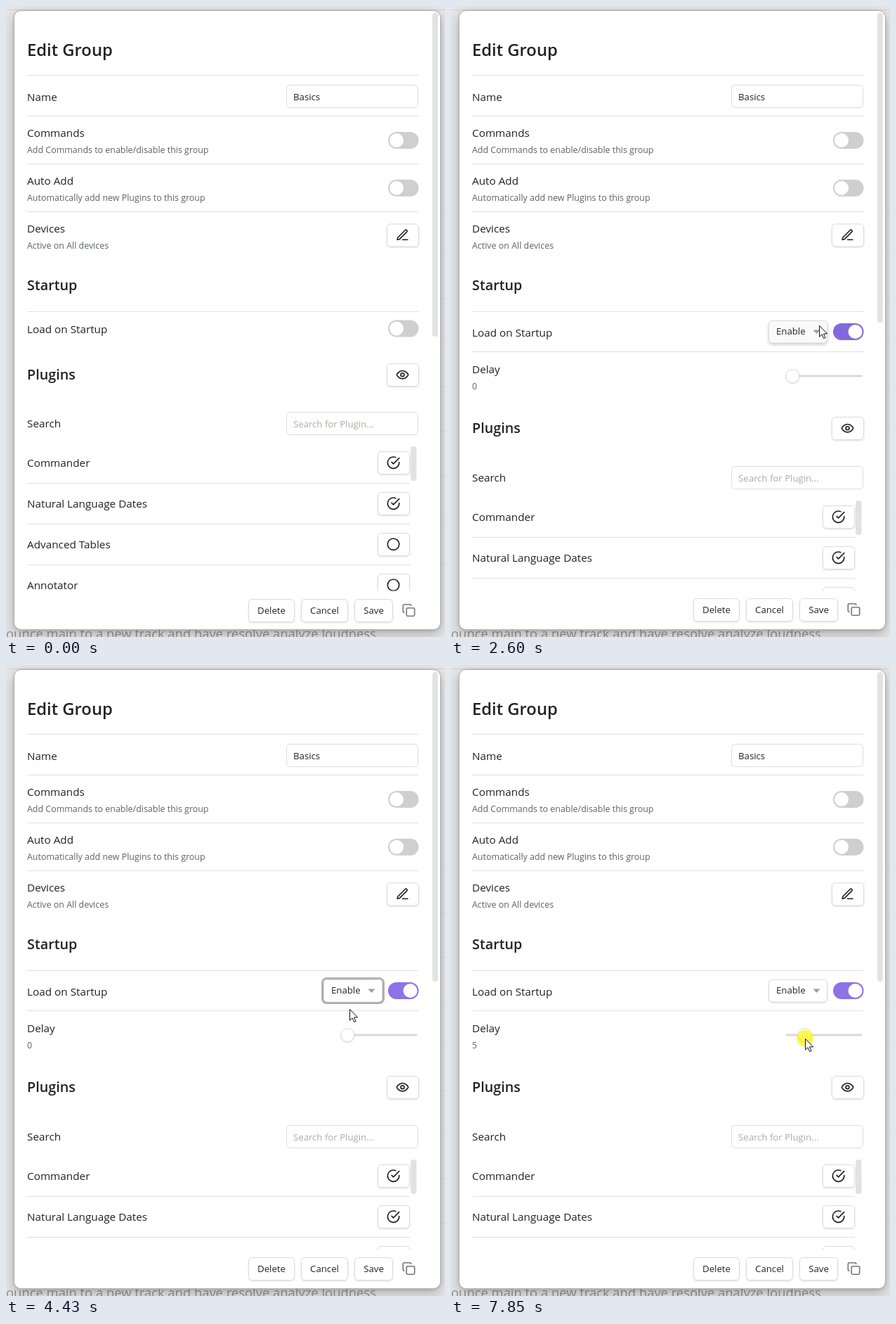
An HTML page that plays this animation: 625x897 px, repeating every 8000 ms.

```html
<!DOCTYPE html>
<html lang="en">
<head>
<meta charset="utf-8">
<title>Edit Group</title>
<style>
html, body { margin: 0; width: 100%; height: 100%; overflow: hidden; background: #e6e6e6; }
svg { display: block; font-family: "Open Sans", "Noto Sans", sans-serif; }
text { fill: #222; white-space: pre; }
.h1 { font-size: 23.8px; font-weight: 600; }
.h2 { font-size: 19.8px; font-weight: 600; }
.row { font-size: 15.3px; }
.sub { font-size: 12.45px; fill: #5f6360; }
.ui { font-size: 13.2px; }
.mid { text-anchor: middle; }
.hint { font-size: 13.2px; fill: #a9ada6; }
.page { font-size: 18.4px; fill: #929292; }
.rule { stroke: #e0e0e0; }
.box { fill: #fff; stroke: #dcdcdc; }
.btn { filter: drop-shadow(0 1px 1px rgba(0,0,0,.13)); }
.hover { fill: #fafafa; filter: drop-shadow(0 2px 2px rgba(0,0,0,.2)); }
.bar { fill: #e2e2e2; }
.icon { fill: none; stroke: #1f1f1f; stroke-width: 2; stroke-linecap: round; stroke-linejoin: round; }
.modal { fill: #fff; stroke: #b0b0b0; filter: drop-shadow(0 1px 2px rgba(0,0,0,.15)) drop-shadow(0 7px 9px rgba(0,0,0,.22)); }
.menu { fill: #fff; stroke: #aaa; stroke-width: .8; filter: drop-shadow(0 18px 16px rgba(0,0,0,.34)); }
</style>
</head>
<body>
<svg id="stage" width="625" height="897" viewBox="0 0 625 897"></svg>
<script>
const LOOP = 8000;
const TICK = 67;
const [SWITCH, OPEN, CHOOSE] = [2000, 2740, 4360]; // clicks
const HOLD = 6060; // slider grabbed

// Pointer stops: start, steps, x, y
const STOPS = [
  [0, 1, 597, 920],
  [320, 1, 597, 888],
  [390, 1, 640, 550],
  [850, 10, 565, 438],
  [1720, 2, 568, 449],
  [2530, 2, 524, 454],
  [3280, 7, 485, 502],
  [3950, 3, 489, 489],
  [4520, 5, 441, 537],
  [4920, 6, 475, 536],
  [5520, 2, 479, 532],
  [6390, 1, 486, 532],
  [6660, 7, 489, 531],
  [7390, 2, 497, 531],
  [7770, 2, 504, 531]
];

const ICONS = {
  pen: '<path d="M12 20h9M16.5 3.5a2.12 2.12 0 0 1 3 3L7 19l-4 1 1-4Z"/>',
  eye: '<path d="M2 12s3-7 10-7 10 7 10 7-3 7-10 7-10-7-10-7Z"/><circle cx="12" cy="12" r="3"/>',
  check: '<path d="M22 11.08V12a10 10 0 1 1-5.93-9.14M9 11l3 3L22 4"/>',
  ring: '<circle cx="12" cy="12" r="10"/>',
  copy: '<rect x="8" y="8" width="14" height="14" rx="2"/><path d="M4 16c-1.1 0-2-.9-2-2V4c0-1.1.9-2 2-2h10c1.1 0 2 .9 2 2"/>'
};

// Markup helpers
const text = (cls, x, y, s) => `<text class="${cls}" x="${x}" y="${y}">${s}</text>`;
const rule = (y, x2 = 587.5) => `<path class="rule" d="M30 ${y}H${x2}"/>`;
const rect = (cls, x, y, w, h, r = 5) =>
  `<rect class="${cls}" x="${x}" y="${y}" width="${w}" height="${h}" rx="${r}"/>`;
const icon = (name, cx, cy, extra = '') =>
  `<g class="icon" transform="translate(${cx} ${cy}) scale(.82) translate(-12 -12)" ${extra}>${ICONS[name]}</g>`;
const iconBtn = (name, x, y) =>
  rect('box btn', x + .5, y + .5, 45, 32) + icon(name, x + 22.5, y + 16.2);
const textBtn = (s, x, w) =>
  rect('box btn', x + .5, 843.5, w, 32) + text('ui mid', x + w / 2 + .5, 864, s);
const input = (cls, y, s) => rect('box', 399.5, y + .5, 187, 32) + text(cls, 409, y + 21.5, s);
const group = (id, body) => `<g id="${id}">${body}</g>`;
const toggle = cy =>
  `<rect x="544" y="${cy - 12}" width="43.5" height="24" rx="12" fill="#cfcfcf"/>` +
  `<circle cx="556" cy="${cy}" r="10" fill="#fff"/>`;

const settings = [
  ['Commands', 'Add Commands to enable/disable this group', toggle],
  ['Auto Add', 'Automatically add new Plugins to this group', toggle],
  ['Devices', 'Active on All devices', cy => iconBtn('pen', 542, cy - 17)]
].map(([name, note, control], i) => {
  const top = 156.5 + 68 * i;
  return rule(top) + text('row', 30, top + 29.5, name) + text('sub', 30, top + 52.5, note) + control(top + 34.5 - i * .25);
}).join('');

const plugins = ['Commander', 'Natural Language Dates', 'Advanced Tables', 'Annotator'].map((name, i) => {
  const y = 633 + Math.round(i * 58.1);
  return text('row', 30, y + 22, name) + iconBtn(i < 2 ? 'check' : 'ring', 529, y) + rule(y + 45.5, 575);
}).join('');

let pageLines = '';
for (let y = 289.5; y < 800; y += 63) pageLines += `<path d="M618 ${y}H625" stroke="#d8d8d8"/>`;

document.getElementById('stage').innerHTML =
  '<defs><clipPath id="cut"><rect x="12" y="560" width="600" height="271.5"/></clipPath></defs>' +
  '<path d="M0 5.5H625" stroke="#d2d2d2"/>' + pageLines +
  text('page', 0, 899, 'ounce main to a new track and have resolve analyze loudness') +
  rect('modal', 11.5, 6.5, 607, 880, 10) +
  '<rect id="scroll" class="bar" x="607" y="10" width="8" rx="4"/>' +
  text('h1', 30, 71, 'Edit Group') + rule(98.5) +
  text('row', 30, 135, 'Name') + input('ui', 112, 'Basics') + settings +
  text('h2', 30, 404, 'Startup') + rule(434.5) +
  group('load', text('row', 30, 465, 'Load on Startup') + group('startup', toggle(458.5))) +
  group('delay', rule(491.5) + text('row', 30, 522, 'Delay') +
    '<text id="value" class="sub" x="30" y="544.5"></text>' +
    '<path d="M478 526H584" stroke="#d9d9d9" stroke-width="3" stroke-linecap="round"/>' +
    '<circle id="knob" class="box btn" cy="526" r="9.5"/>' +
    '<rect id="focus" x="450.5" y="445.5" width="87" height="35" rx="6" fill="none" stroke="#b4b4b4" stroke-width="3"/>' +
    group('select', rect('box btn', 452.5, 447.5, 83, 31.5)) + text('ui', 463, 467, 'Enable') +
    '<path d="M515.5 460.5h10l-5 5.5z" fill="#aa9a90"/>') +
  group('head', text('h2', 30, 531, 'Plugins') + iconBtn('eye', 542, 508)) +
  '<g clip-path="url(#cut)">' +
  group('body', text('row', 30, 599, 'Search') + input('hint', 577, 'Search for Plugin...') +
    plugins + rect('bar', 576, 626, 8.5, 49, 4)) + '</g>' +
  group('foot', textBtn('Delete', 345, 65) + textBtn('Cancel', 420, 66) + textBtn('Save', 496, 54) +
    icon('copy', 573.5, 859, 'style="stroke:#777"')) +
  group('menu', '<path class="menu" d="M452.5 480H535.5V515a5 5 0 0 1-5 5H457.5a5 5 0 0 1-5-5Z"/>' +
    '<rect id="pick" x="453" width="82" height="20" fill="#1e90ff"/>' +
    group('options', text('ui', 464, 495, 'Enable') + text('ui', 464, 515, 'Disable'))) +
  '<circle id="press" r="11.8" fill="#fff200" opacity=".68"/>' +
  '<path id="cursor" d="M.5 .5V16.2L4.1 12.8 6.7 18.6 9 17.6 6.5 11.9H11.6Z" fill="#fff" stroke="#111"/>';

const el = id => document.getElementById(id);
const show = (id, on) => { el(id).style.display = on ? '' : 'none'; };
const place = (id, x, y) => el(id).setAttribute('transform', `translate(${x} ${y})`);
const within = (t, a, b) => t >= a && t < b;
const stepped = (t, start, n) => Math.min(1, (Math.floor((t - start) / TICK) + 1) / n);

// Each move eases out from the previous stop
function pointer(t) {
  const i = STOPS.findLastIndex(s => s[0] <= t);
  const [start, n, x, y] = STOPS[i];
  const [, , fromX, fromY] = STOPS[Math.max(0, i - 1)];
  const left = (1 - stepped(t, start, n)) ** 3;
  return [x + (fromX - x) * left, y + (fromY - y) * left];
}

function draw(t) {
  const [x, y] = pointer(t);
  const open = t >= SWITCH + TICK;
  const menu = within(t, OPEN + TICK, CHOOSE + TICK);

  place('cursor', x, y);
  place('press', x, y - .5);
  show('press', t >= HOLD || within(t, SWITCH, SWITCH + 4 * TICK) ||
    within(t, OPEN, OPEN + 2 * TICK) || within(t, CHOOSE, CHOOSE + TICK));

  const shifts = { load: 4.5, head: 76, body: 77, foot: -1 };
  for (const id in shifts) place(id, 0, open ? shifts[id] : 0);
  el('scroll').setAttribute('height', open ? 440 : 460);
  show('delay', open);

  const [track, dot] = el('startup').children;
  dot.setAttribute('cx', 556 + (open ? 19.5 * stepped(t, SWITCH + TICK, 3) : 0));
  track.setAttribute('fill', !open ? '#cfcfcf' : t < OPEN ? '#8469dc' : '#8d72e8');

  const value = t < HOLD ? 0 : Math.max(0, Math.round((x - 488) / 3.2));
  el('value').textContent = value;
  el('knob').setAttribute('cx', 486.3 + 3.54 * value);

  const hover = within(x, 452, 536) && within(y, 447, 480);
  el('select').firstChild.setAttribute('class', hover ? 'box hover' : 'box btn');
  show('focus', within(t, OPEN + TICK, HOLD));

  show('menu', menu);
  const picked = y >= 500 ? 1 : 0;
  el('pick').setAttribute('y', 480 + 20 * picked);
  [...el('options').children].forEach((o, i) => { o.style.fill = i === picked ? '#fff' : '#222'; });
}

const began = performance.now();
function tick() {
  draw((performance.now() - began) % LOOP);
  requestAnimationFrame(tick);
}
tick();
</script>
</body>
</html>
```
